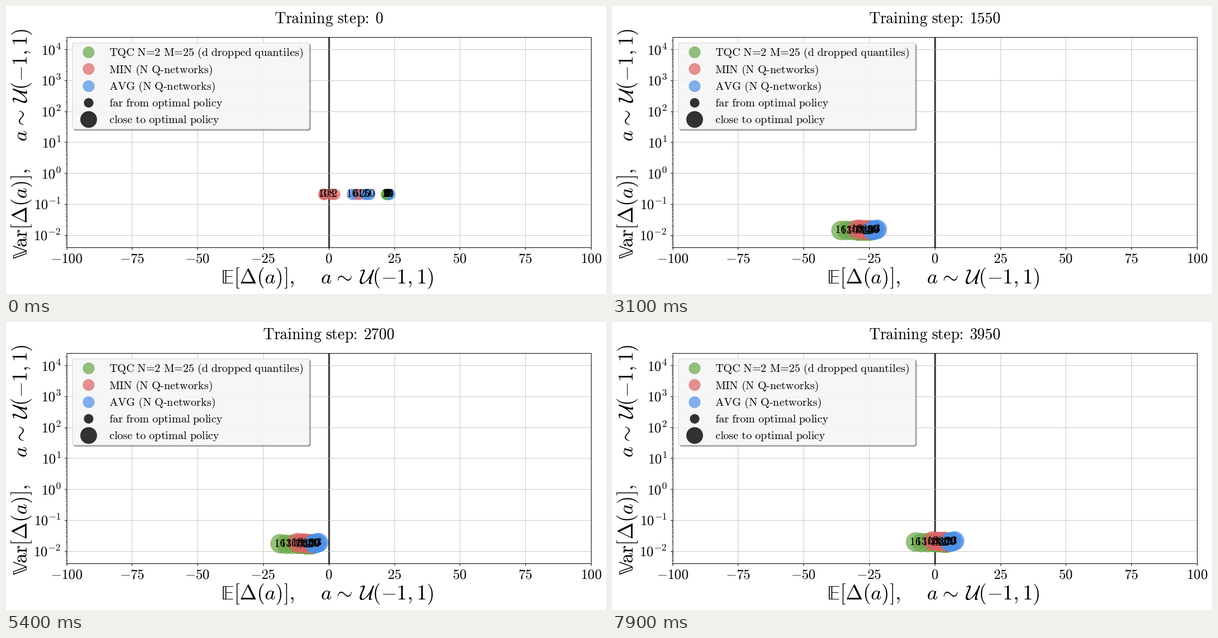
A matplotlib script that plays this animation: 1078x519 px, repeating every 8000 ms.

```python
import matplotlib.pyplot as plt
import numpy as np
from matplotlib.animation import FuncAnimation
from matplotlib.patches import FancyBboxPatch
from matplotlib.ticker import LogLocator

W, H, DPI = 1078, 519, 128
PX = 72 / DPI  # points per pixel
FRAMES, INTERVAL = 80, 100
GREEN, RED, BLUE = "#6aa648", "#da6464", "#4f8fe3"
START_Y = 338.5

plt.rcParams["mathtext.fontset"] = "cm"
rng = np.random.default_rng(4)


def words(s):
    """Upright text with a wider gap after a colon."""
    parts = "\\ ".join(rf"\text{{{w}}}" for w in s.split())
    return "$" + parts.replace(":}", r":}\hspace{0.11}") + "$"


fig = plt.figure(figsize=(W / DPI, H / DPI), dpi=DPI, facecolor="white")

# plot frame, grid and ticks
left, right, top, bottom = 108.6, 1051, 56.2, 434.8
mid, unit = (left + right) / 2, (right - left) / 200
ax = fig.add_axes([left / W, 1 - bottom / H,
                   (right - left) / W, (bottom - top) / H])
ax.set_yscale("log")
ax.set_xlim(-100, 100)
ax.set_ylim(0.004, 25000)
ax.set_xticks(range(-100, 101, 25))
ax.yaxis.set_major_locator(LogLocator(numticks=12))
ax.yaxis.set_minor_locator(LogLocator(subs=range(2, 10), numticks=12))
ax.tick_params(which="major", length=4 * PX, width=PX,
               labelleft=False, labelbottom=False)
ax.tick_params(which="minor", length=2.5 * PX, width=0.7 * PX,
               labelleft=False)
ax.axvline(0, color="black", lw=3 * PX, zorder=1)
ax.grid(color="#bcbcbc", lw=0.8 * PX)
ax.set_axisbelow("line")
for spine in ax.spines.values():
    spine.set_linewidth(PX)

# overlay in pixel coordinates, y pointing down
over = fig.add_axes([0, 0, 1, 1])
over.set_xlim(0, W)
over.set_ylim(H, 0)
over.axis("off")


def put(x, y, s, size, ha="left", va="baseline", **kw):
    return over.text(x, y, s, fontsize=size * PX, ha=ha, va=va, **kw)


def area(r):
    return (2 * r * PX) ** 2


def discs(x, y, r, color, alpha, z, edge="face"):
    return over.scatter(x, y, s=area(r), c=color, edgecolors=edge,
                        alpha=alpha, linewidths=PX, zorder=z)


# tick and axis labels
for v in range(-100, 101, 25):
    put(mid + unit * v, 462.5, f"${v}$", 25, "center")
for e in range(-2, 5):
    put(99, 311 - 55.75 * e, f"$10^{{{e}}}$", 25, "right")

ACTION = r"$a\hspace{0.09}\sim\hspace{0.2}\mathcal{U}(-1,1)$"
side = dict(rotation=90, rotation_mode="anchor")
put(386, 500.5, r"$\mathrm{\mathbb{E}}[\Delta(a)],$", 37)
put(565, 500.5, ACTION, 37)
put(38.5, 456, r"$\mathrm{\mathbb{V}ar}[\Delta(a)],$", 37, **side)
put(38.5, 244, ACTION, 37, **side)

# legend
for shift, style in ((2, dict(fc="#4a4a4a", ec="#4a4a4a", alpha=0.5)),
                     (0, dict(fc="#fdfdfd", ec="#cccccc", alpha=0.93))):
    over.add_patch(FancyBboxPatch(
        (119.5 + shift, 66.5 + shift), 425.5, 155.5, lw=PX, zorder=1,
        boxstyle="round,pad=0,rounding_size=4", **style))

LEGEND = [
    (GREEN, 11, 0.7, "TQC N=2 M=25 (d dropped quantiles)"),
    (RED, 11, 0.7, "MIN (N Q-networks)"),
    (BLUE, 11, 0.7, "AVG (N Q-networks)"),
    ("black", 9, 0.8, "far from optimal policy"),
    ("black", 15.5, 0.8, "close to optimal policy"),
]
for k, (color, r, alpha, label) in enumerate(LEGEND):
    y = 83.4 + 30.05 * k
    over.plot([128, 169], [y, y], color="white", lw=2 * PX, alpha=0.8,
              zorder=2)
    discs([148], [y], r, color, alpha, 3, "white")
    put(185, y + 7, words(label), 20.3)


class Cloud:
    """One method: labelled discs with a start and a place in the cluster."""

    def __init__(self, color, labels, start, dx, dy, z):
        self.start, self.dx, self.dy = start, dx, dy
        ys = np.full(len(labels), START_Y)
        self.dots = discs(start, ys, 10, color, 0.7, z)
        self.tags = [put(x, START_Y, f"${n}$", 20.3, "center", "center",
                         zorder=9) for x, n in zip(start, labels)]

    def move(self, x, y, spread, rest, r):
        xs = rest * self.start + (1 - rest) * (x + spread * self.dx)
        ys = rest * START_Y + (1 - rest) * (y + self.dy)
        self.dots.set_offsets(np.column_stack([xs, ys]))
        self.dots.set_sizes([area(r)])
        for tag, pos in zip(self.tags, zip(xs, ys)):
            tag.set_position(pos)


title = put(580, 31, words("Training step: 0"), 27.8, "center")

d = np.array([16, 13, 10, 7, 6, 5, 4, 3, 2, 1, 0])
n_min = np.array([10, 8, 6, 4, 3, 2])
n_avg = np.array([3, 5, 10, 20, 50])
low = 1 - d / 16
clouds = [
    Cloud(GREEN, d, rng.uniform(683, 686, len(d)), 57 * low, 1.5 * low, 4),
    Cloud(RED, n_min, np.array([571, 585, 629, 635, 571, 590]),
          66 - 3.5 * n_min, -n_min / 5, 5),
    Cloud(BLUE, n_avg, np.array([689, 648, 622, 645, 653]),
          61 + 27 / n_avg, -6 / n_avg, 6),
]


def update(i):
    t = i * INTERVAL / 1000
    x = 618 - 427.6 * np.exp(-np.hypot(t, 1) / 4.5)  # bias recovers
    y = 413.1 - 8.14 * np.log(max(t, 0.8))  # variance grows as a power of t
    spread = np.tanh(t / 1.8)
    rest = max(0, 1 - t / 0.6) ** 1.5  # what is left of the first layout
    for cloud in clouds:
        cloud.move(x, y, spread, rest, 17 - 7.3 * rest)
    title.set_text(words(f"Training step: {50 * i}"))
    return [title]


anim = FuncAnimation(fig, update, frames=FRAMES, interval=INTERVAL,
                     repeat=True, repeat_delay=0, blit=False)
plt.show()
```
